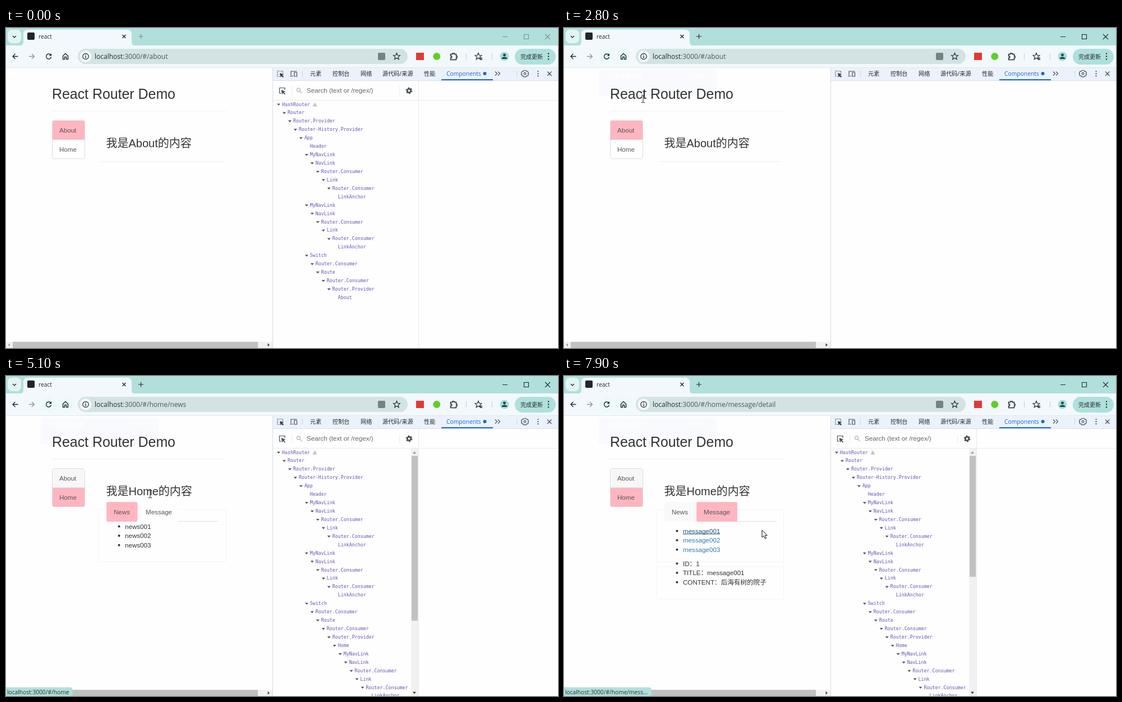
An HTML page that plays this animation: 984x569 px, repeating every 8 s.

```html
<!DOCTYPE html>
<html lang="zh">
<head>
<meta charset="utf-8">
<title>React Router Demo</title>
<style>
  html, body { margin: 0; width: 100%; height: 100%; overflow: hidden; background: #fefefe; }
  svg { display: block; }
  text { font-family: "Liberation Sans", Arial, "Noto Sans CJK SC", "Noto Sans CJK", sans-serif; font-size: 11.6px; fill: #333; white-space: pre; }
  .ui { font-family: "Open Sans", "Noto Sans CJK SC", "Noto Sans CJK", sans-serif; font-size: 10.2px; fill: var(--ink, #202c2c); }
  .url { font-size: 12px; }
  .tree text { font-family: "DejaVu Sans Mono", monospace; font-size: 8.3px; fill: #6a51b2; }
  .tree path { fill: #555; }
  .h2 { font-size: 24.9px; }
  .h3 { font-size: 20px; }
  .nav { fill: #555; }
  .link { fill: #337ab7; }
  .pink { fill: #ffb6c1; }
  .line { fill: none; stroke: #eee; }
  .ink { fill: none; stroke: #1d2b2b; stroke-width: 1.4; }
  .dev { fill: none; stroke: #474f55; stroke-width: 1.2; }
  .win { fill: none; stroke: #1c2a2a; stroke-width: 1.1; }
  .win.idle { stroke: #6f9391; }
  .track { fill: #f1f1f1; }
  .thumb { fill: #c1c1c1; }
  .faded { --ink: #fff; }
</style>
</head>
<body>
<svg width="984" height="569" viewBox="0 0 984 569">
  <defs>
    <g id="controls">
      <path d="M236 15h9M240.500 10.500v9M885 15.500h9M923.500 11.500h8v8h-8zM961 11l9 9m0-9l-9 9"/>
    </g>
    <g id="firstItem">
      <text class="ui" x="79" y="90">正常重新加载</text>
      <text class="ui" x="222" y="90">Ctrl+R</text>
    </g>
  </defs>

  <!-- Window frame -->
  <rect width="984" height="32" fill="#b1e0dc"/>
  <rect x="3" y="3" width="24" height="24" rx="8" fill="#e3f5f3"/>
  <path class="ink" d="M12 14l3 3 3-3"/>
  <path d="M23 32q8 0 8-8V11q0-8 8-8h177q8 0 8 8v13q0 8 8 8z" fill="#f2f8fc"/>
  <rect data-t="0 25 28 80" x="38" y="8" width="13" height="13" rx="2" fill="#20262e"/>
  <circle data-t="25 28" cx="44.500" cy="14.500" r="5" fill="none" stroke="#2b8f87" stroke-width="1.600" stroke-dasharray="22 10"/>
  <text class="ui" x="58" y="19">react</text>
  <path class="ink" d="M207.500 12l6 6m0-6l-6 6"/>
  <use data-t="0 15" class="win idle" href="#controls"/>
  <use data-t="15 80" class="win" href="#controls"/>

  <!-- Address bar -->
  <rect y="31" width="984" height="39" fill="#f2f8fc"/>
  <circle data-t="11 80" cx="76" cy="50.500" r="13.500" fill="#ebfaf9"/>
  <circle data-t="10 80" cx="106" cy="50.500" r="13.500" fill="#ebfaf9"/>
  <path class="ink" d="M21.500 50.500h-9m4-4.500l-4.500 4.500 4.500 4.500"/>
  <path class="ink" d="M41 50.500h9m-4-4.500l4.500 4.500-4.500 4.500" style="stroke:#8b9b9d"/>
  <g data-t="0 25 27 80">
    <path class="ink" d="M79.500 47.500a4.500 4.500 0 1 0 1 4"/>
    <path d="M81 45v4.500h-4.500z" fill="#1d2b2b"/>
  </g>
  <path data-t="25 27" class="ink" d="M72 46.500l8 8m0-8l-8 8"/>
  <path class="ink" d="M101.500 49.500l4.500-4 4.500 4v6h-3v-4h-3v4h-3z"/>
  <rect x="128" y="37" width="588" height="27" rx="13.500" fill="#d3e3e3"/>
  <circle cx="142" cy="50.500" r="10.500" fill="#f2f8fc"/>
  <circle class="ink" cx="142" cy="50.500" r="5.200" style="stroke-width:1.200"/>
  <path class="ink" d="M142 49.500v4M142 47v1.300"/>
  <text class="ui url" x="158" y="55">localhost<tspan id="path" fill="#4a5757"></tspan></text>
  <rect x="663" y="44" width="13" height="13" rx="2" fill="#758383"/>
  <path id="star" class="ink" d="M696.500 44.500l1.700 4 4.200.3-3.200 2.800 1 4.200-3.700-2.300-3.700 2.300 1-4.200-3.200-2.800 4.200-.3z" style="stroke-width:1.200"/>
  <use href="#star" x="145.500"/>
  <path class="ink" d="M844 53.500h5M845.500 56h3.500"/>
  <rect x="731" y="44" width="14" height="13" fill="#df3b32"/>
  <circle cx="767.800" cy="50.500" r="6.500" fill="#62cf27"/>
  <path class="ink" d="M792.500 46.500h3.500v-1.500h3v1.500h3.500v3.500h1.500v3h-1.500v3.500h-10v-3.500h2v-3h-2z"/>
  <path d="M820.500 45v11M866.500 45v11" stroke="#a3d8d3"/>
  <circle cx="888.500" cy="50.500" r="8" fill="#a9dcd8"/>
  <circle cx="888.500" cy="48" r="2.400" fill="#17494a"/>
  <path d="M883.500 55q0-3.500 5-3.500t5 3.500z" fill="#17494a"/>
  <rect x="907" y="37" width="73" height="28" rx="14" fill="#afe0dc"/>
  <text class="ui" x="917" y="54.500" style="font-size:10px">完成更新</text>
  <path d="M967 45.500v.1m0 4.900v.1m0 4.900v.1" stroke="#1d2b2b" stroke-width="2.400" stroke-linecap="round"/>
  <path d="M0 70.500h984" stroke="#dfe9ea"/>

  <!-- Page -->
  <g data-t="25 80" class="faded">
    <rect x="62" y="75" width="210" height="46" fill="#f9fafd"/>
    <use href="#firstItem"/>
  </g>
  <text class="h2" x="82" y="126">React Router Demo</text>
  <path class="line" d="M82 147.500h310"/>
  <rect x="82.500" y="164.500" width="58" height="68" rx="3" fill="#fff" stroke="#ddd"/>
  <rect data-t="0 45" class="pink" x="83" y="165" width="57" height="33.500"/>
  <rect data-t="45 80" x="83" y="165" width="57" height="33.500" fill="#f7f7f7"/>
  <rect data-t="42 45" x="83" y="199" width="57" height="33" fill="#f5f5f5"/>
  <rect data-t="45 80" class="pink" x="83" y="199" width="57" height="33"/>
  <path d="M83 198.500h57" stroke="#ddd"/>
  <text class="nav" x="95" y="186">About</text>
  <text class="nav" x="95" y="220">Home</text>

  <g data-t="0 45">
    <text class="h3" x="178.500" y="212">我是About的内容</text>
    <path class="line" d="M168 237.500h220"/>
  </g>
  <g data-t="45 80">
    <rect class="line" x="165.500" y="237.500" width="226" height="93" rx="3" style="stroke:#f3f3f3"/>
    <path data-t="57 80" class="line" d="M165.500 331v5q0 3 3 3h220q3 0 3-3v-5" style="stroke:#f3f3f3"/>
    <path data-t="69 80" class="line" d="M165.500 339v55q0 3 3 3h220q3 0 3-3v-55" style="stroke:#f3f3f3"/>
    <text class="h3" x="178.500" y="212">我是Home的内容</text>
    <rect x="179" y="224" width="130" height="35" fill="#fefefe"/>
    <path d="M307 258.500h71" stroke="#ddd"/>
    <rect data-t="45 57" class="pink" x="179" y="224" width="55.500" height="35" rx="3"/>
    <rect data-t="57 80" x="179" y="224" width="55.500" height="35" rx="3" fill="#f9f9f9"/>
    <rect data-t="55 57" x="236" y="224" width="73" height="35" rx="3" fill="#eee"/>
    <rect data-t="57 63" class="pink" x="236.500" y="224.500" width="72" height="34" rx="3" stroke="#e9dadc"/>
    <rect data-t="63 80" class="pink" x="236" y="224" width="73" height="35" rx="3"/>
    <text class="nav" x="192" y="246">News</text>
    <text class="nav" x="249" y="246">Message</text>
    <g data-t="45 57" id="news"></g>
    <g data-t="57 80" id="messages"></g>
    <path data-t="66 80" d="M212 281h66" stroke="#23527c"/>
    <g data-t="69 80" id="detail"></g>
  </g>

  <rect class="track" y="558" width="475" height="11"/>
  <rect class="thumb" x="12" y="558" width="437" height="11"/>
  <path d="M7 560.500v6l-3.500-3z" fill="#a3a3a3"/>
  <path d="M466.500 560.500v6l3.500-3z" fill="#444"/>
  <g data-t="45 55">
    <path d="M0 553.500h114q4.500 0 4.500 4.500v11H0z" fill="#b1e0dc"/>
    <text class="ui" x="2" y="566">localhost:3000/#/home</text>
  </g>
  <g data-t="55 80">
    <path d="M0 553.500h151q4.500 0 4.500 4.500v11H0z" fill="#b1e0dc"/>
    <text class="ui" x="2" y="566">localhost:3000/#/home/mess...</text>
  </g>

  <!-- Developer tools -->
  <rect x="476" y="71" width="508" height="498" fill="#fefefe"/>
  <rect x="476" y="71" width="508" height="22" fill="#ecf2fb"/>
  <path d="M475.500 71v498M476 93.500h508" stroke="#d5dee8"/>
  <path d="M528.500 76v11M910.500 76v11" stroke="#cbd5e0"/>
  <rect class="dev" x="484" y="76.500" width="9.500" height="9.500" stroke-dasharray="2 1.400"/>
  <path d="M488 80l7 2.500-3 1.200 3 3-1.200 1.200-3-3-1.300 2.600z" fill="#333b40"/>
  <path class="dev" d="M508 84v-7h10.500M506 85.500h6M514 79h4.500v7h-4.500z"/>
  <g id="tabs"></g>
  <circle cx="853.500" cy="81" r="3" fill="#1a67d2"/>
  <path d="M776 92h92" stroke="#1a67d2" stroke-width="2"/>
  <path class="dev" d="M872 77.500l3.500 3.500-3.500 3.500m5-7l3.500 3.500-3.500 3.500M965 77.500l7.500 7.500m0-7.500l-7.500 7.500"/>
  <path class="dev" d="M923 75.500h4l1 1.700h2l1.500 2.600-1 1.400 1 1.400-1.500 2.600h-2l-1 1.700h-4l-1-1.700h-2l-1.500-2.600 1-1.400-1-1.400 1.500-2.600h2z"/>
  <circle class="dev" cx="925" cy="81.200" r="1.800"/>
  <path d="M948.500 77v.1m0 4v.1m0 4v.1" stroke="#474f55" stroke-width="2.200" stroke-linecap="round"/>

  <g data-t="0 26 31 80">
    <path d="M476 128.500h508M735.500 94v475M509.500 104v15M701.500 104v15" stroke="#eaeaea"/>
    <path class="dev" d="M497 110v-3.500h-9.500v9.500h3.500"/>
    <path d="M490.500 110l8 3-3.400 1.200 3 3-1.200 1.200-3-3-1.400 3z" fill="#474f55"/>
    <circle cx="521.500" cy="110" r="3" fill="none" stroke="#bbb" stroke-width="1.300"/>
    <path d="M523.500 112l4 4" stroke="#bbb" stroke-width="1.300"/>
    <text x="536" y="115" style="fill:#666">Search (text or /regex/)</text>
    <g transform="translate(718.500 111.500)" fill="none" stroke="#474f55">
      <circle r="3.200" stroke-width="2.600"/>
      <circle r="5" stroke-width="1.800" stroke-dasharray="2.600 2.636"/>
    </g>
  </g>
  <g class="tree" data-t="0 26 32 80">
    <g id="base"></g>
    <path d="M550.500 132l4 7.500h-8z" style="fill:#c4c4c4"/>
    <g data-t="0 46" id="aboutTree"></g>
    <g data-t="46 80" id="homeTree"></g>
  </g>
  <g data-t="46 80">
    <rect class="track" x="722" y="129" width="13" height="440"/>
    <rect class="thumb" id="thumb" x="723" y="142" width="11" height="293"/>
    <path d="M725 138h6l-3-4z" fill="#9a9a9a"/>
    <path d="M725 561.500h6l-3 4z" fill="#444"/>
  </g>

  <!-- Reload menu -->
  <g data-t="15 25">
    <rect x="62" y="76" width="211" height="74" rx="4" fill="#000" opacity=".12"/>
    <rect x="62" y="75" width="210" height="72" rx="3" fill="#f5f7fc"/>
    <rect data-t="18 19" x="62" y="75" width="210" height="23" fill="#dde5e8"/>
    <rect data-t="19 21" x="62" y="98" width="210" height="23" fill="#dde5e8"/>
    <rect data-t="21 25" x="62" y="121" width="210" height="23" fill="#dde5e8"/>
    <use href="#firstItem"/>
    <text class="ui" x="79" y="113">硬性重新加载</text>
    <text class="ui" x="199" y="113">Ctrl+Shift+R</text>
    <text class="ui" x="79" y="136">清空缓存并硬性重新加载</text>
  </g>

  <g id="cursor">
    <path id="arrow" d="M0 0v13l3-2.800 2.200 5 2.200-1-2.200-4.800h4z" fill="#fff" stroke="#111" stroke-linejoin="round"/>
    <path id="hand" d="M-1.500 1.500q0-1.500 1.500-1.500t1.500 1.500V7q2.500-1 3 .5 2.200-.5 2.500 1 2-.3 2 1.500v4q0 2-1.500 3.500v2H.500v-1.500Q-2 15.500-4.500 11.500q0-2 3-.5z" fill="#fff" stroke="#111" stroke-linejoin="round"/>
    <path id="beam" d="M-3-6.500h2.200l.8.800.8-.8H3M-3 6.500h2.200l.8-.8.8.8H3M0-6v12" fill="none" stroke="#222"/>
  </g>
</svg>

<script>
const $ = id => document.getElementById(id);
const LOOP = 8000, TICK = 100;

const label = (x, y, s, cls = '', style = '') =>
  `<text class="${cls}" x="${x}" y="${y}" style="${style}">${s}</text>`;

const list = (id, y, items, cls) => {
  $(id).innerHTML = items.map((s, i) =>
    `<circle cx="201.500" cy="${y - 4 + i * 16.6}" r="2" fill="#333"/>` +
    label(212, y + i * 16.6, s, cls)).join('');
};
list('news', 271.5, ['news001', 'news002', 'news003']);
list('messages', 279.5, ['message001', 'message002', 'message003'], 'link');
list('detail', 337.5, ['ID：1', 'TITLE：message001', 'CONTENT：后海有树的院子']);
const firstLink = $('messages').querySelector('text');

$('tabs').innerHTML = [[542, '元素'], [582, '控制台'], [632, '网络'], [671, '源代码/来源'], [745, '性能']]
  .map(([x, s]) => label(x, 85, s, 'ui')).join('') +
  label(785, 85, 'Components', 'ui', 'fill:#1a67d2;font-size:10.3px');

// Each row nests one level deeper; a leading "-" marks a leaf.
const addTree = (id, row, depth, names) => {
  $(id).innerHTML += names.map((name, i) => {
    const leaf = name[0] === '-', x = 492 + (depth + i) * 9.97, y = 135.5 + (row + i) * 14.93;
    return label(x, y + 3, name.slice(leaf)) +
      (leaf ? '' : `<path d="M${x - 9} ${y - 1}h6l-3 3.500z"/>`);
  }).join('');
};
const navLink = ['MyNavLink', 'NavLink', 'Router.Consumer', 'Link', 'Router.Consumer', '-LinkAnchor'];
addTree('base', 0, 0, ['HashRouter', 'Router', 'Router.Provider', 'Router-History.Provider', 'App', '-Header']);
addTree('base', 6, 5, navLink);
addTree('base', 12, 5, navLink);
addTree('base', 18, 5, ['Switch', 'Router.Consumer', 'Route', 'Router.Consumer', 'Router.Provider']);
addTree('aboutTree', 23, 10, ['-About']);
addTree('homeTree', 23, 10, ['Home', ...navLink]);

// Pointer way points: tick, x, y and, where it changes, the shape
const way = [
  [1, 955, 12, 'arrow'], [3, 650, 40], [5, 403, 66], [6, 318, 80], [7, 230, 84], [8, 172, 83],
  [9, 133, 71], [11, 100, 50], [12, 80, 46], [13, 76, 45], [15, 76, 45], [21, 127, 131],
  [25, 127, 131], [26, 141, 126, 'beam'], [30, 141, 126], [32, 118, 138, 'arrow'], [34, 117, 137],
  [36, 117, 137], [38, 127, 168, 'hand'], [40, 128, 190], [43, 115, 212], [47, 115, 212],
  [49, 175, 207, 'arrow'], [50, 212, 208, 'beam'], [51, 257, 210], [53, 278, 222, 'arrow'],
  [55, 266, 239, 'hand'], [62, 266, 239], [64, 257, 260, 'arrow'],
  [66, 250, 273, 'hand'], [67, 249, 273], [76, 249, 273], [77, 285, 276, 'arrow'], [79, 353, 274],
];
const shapes = ['arrow', 'hand', 'beam'];
way.forEach((p, i) => { p[3] ??= way[i - 1][3]; });

const show = (el, on) => { el.style.display = on ? '' : 'none'; };

function movePointer(t) {
  const i = way.findLastIndex(p => p[0] <= t);
  show($('cursor'), i >= 0);
  if (i < 0) return;
  const a = way[i], b = way[i + 1] || a;
  const k = b === a ? 0 : (t - a[0]) / (b[0] - a[0]);
  const at = n => a[n] + (b[n] - a[n]) * k;
  $('cursor').setAttribute('transform', `translate(${at(1)} ${at(2)})`);
  shapes.forEach(s => show($(s), s === a[3]));
}

const timed = [...document.querySelectorAll('[data-t]')]
  .map(el => [el, el.dataset.t.split(' ').map(Number)]);
const pick = (t, steps) => steps.findLast(s => s[0] <= t)[1];

function draw(t) {
  // An odd number of passed bounds means the part is showing.
  for (const [el, bounds] of timed) show(el, bounds.filter(b => b <= t).length % 2);
  $('path').textContent = ':3000/#/' +
    pick(t, [[0, 'about'], [45, 'home/news'], [57, 'home/message'], [69, 'home/message/detail']]);
  $('thumb').setAttribute('height', pick(t, [[0, 293], [57, 232], [69, 215]]));
  firstLink.style.fill = t >= 66 ? '#23527c' : '';
  movePointer(t);
}

const start = performance.now();
let last = -1;
function frame() {
  const t = Math.floor((performance.now() - start) % LOOP / TICK);
  if (t !== last) draw(last = t);
  requestAnimationFrame(frame);
}
frame();
</script>
</body>
</html>
```
